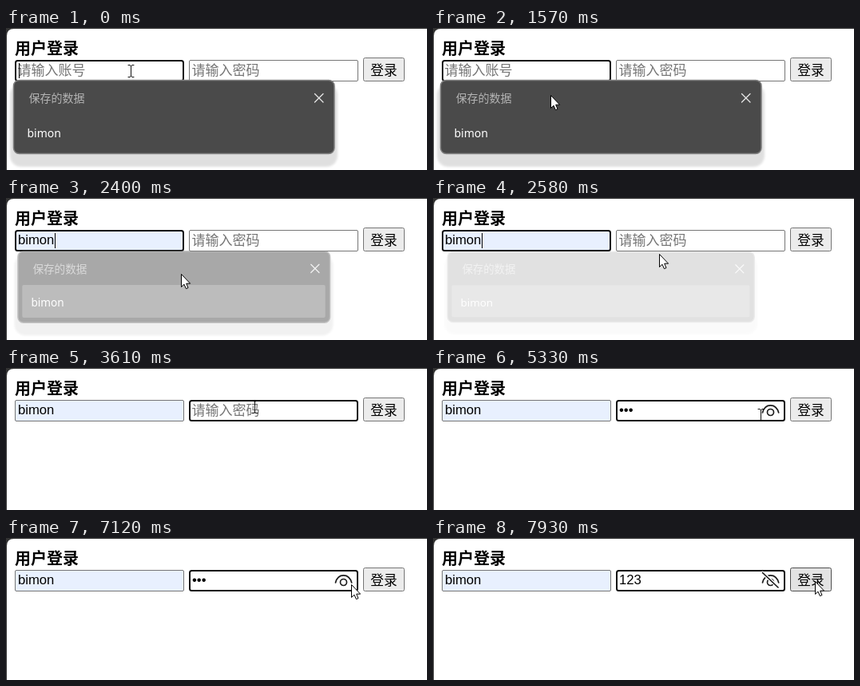
Recreate the animation shown at these times as an HTML page. Size 527 px wide and 178 px high, loop 8 s.

```html
<!DOCTYPE html>
<html lang="zh-CN">
<head>
<meta charset="utf-8">
<title>用户登录</title>
<style>
  html, body { margin: 0; width: 100%; height: 100%; overflow: hidden; background: #333; }
  svg { display: block; width: 527px; height: 178px; }
  text { font: 16.67px "Liberation Sans", sans-serif; white-space: pre; }
  .cjk { font-family: "Noto Sans CJK SC", "Noto Sans CJK", sans-serif; }
  .title { font-size: 20px; font-weight: 700; }
  .hint { font-size: 17px; fill: #757575; }
  .head { font-size: 14px; fill: #b4b4b4; }
  .item { font: 500 14px "Noto Sans", "Open Sans", sans-serif; fill: #fff; }
  .shadow { opacity: .12; filter: blur(1.5px); }
  .line { fill: none; stroke-linecap: round; }
</style>
</head>
<body>
<svg viewBox="0 0 527 178">
  <path d="M1 178V10Q1 1 10 1H527V178Z" fill="#fff"/>
  <text class="cjk title" x="11" y="32.5">用户登录</text>

  <rect id="user"/>
  <text id="userHint" class="cjk hint" x="14.5" y="58.7">请输入账号</text>
  <text id="userText" x="15" y="58">bimon</text>

  <rect id="pass"/>
  <text id="passHint" class="cjk hint" x="232.5" y="58.7">请输入密码</text>
  <text id="passText" x="233" y="58"></text>
  <g id="eye" class="line" stroke="#1c1c1c" stroke-width="1.7">
    <path d="M412.5 56C414 50 418 46.8 422.5 46.8S431 50 432.7 56"/>
    <circle cx="422.5" cy="55.5" r="4"/>
    <g id="slash">
      <path d="M412.5 43.5L433 62.5" stroke="#fff" stroke-width="4"/>
      <path d="M412.5 43.5L432 62"/>
    </g>
  </g>

  <rect id="button" x="447.5" y="37.5" width="51" height="29" rx="2"/>
  <text class="cjk" x="456.3" y="58.7">登录</text>
  <rect id="caret" y="44" height="19"/>

  <g id="popup">
    <rect class="shadow" x="5" y="70" width="410" height="104" rx="14"/>
    <rect x="9.5" y="65.5" width="401.5" height="92" rx="7" fill="#4a4a4a" stroke="#808080" stroke-width="1.5"/>
    <rect id="row" x="15" y="109" width="390" height="42" rx="2" fill="#757575"/>
    <text class="cjk head" x="28.5" y="93.3">保存的数据</text>
    <text class="item" x="26.5" y="137">bimon</text>
    <path class="line" d="M386.5 82.5l10.5 10.5m0-10.5l-10.5 10.5" stroke="#e6e6e6" stroke-width="1.3"/>
  </g>

  <path id="arrow" d="M.5.5V16.5L4 13.2L6.4 18.7L9 17.6L6.7 12.2H11.6Z" fill="#fff" stroke="#000"/>
  <g id="beam" class="line">
    <path d="M-3.5-7.5H-1.5L0-6.5L1.5-7.5H3.5M0-6.5V6.5M-3.5 7.5H-1.5L0 6.5L1.5 7.5H3.5" stroke="#111"/>
  </g>
</svg>
<script>
const LOOP = 8000, BLINK = 515, FADE = 560;
const HOVER = 1640, PICK = 2110, FOCUS = 3000, REVEAL = 7550;
const KEYS = [3970, 4160, 4360];
const RESETS = [-265, PICK, FOCUS + 90, ...KEYS];   // caret blink restarts

// pointer moves: start, end, x, y
const HOME = [156, 54];
const MOVES = [
  [1290, 1990, 133, 128],
  [2160, 2580, 283, 70],
  [2580, 2900, 311, 49],
  [4890, 5330, 410, 59],
  [5330, 5630, 430, 65],
  [5730, 6430, 458, 63],
  [6550, 7310, 423, 56],
  [REVEAL, 7930, 478, 54]
];

const el = {};
document.querySelectorAll("[id]").forEach(n => el[n.id] = n);

const clamp = v => Math.min(1, Math.max(0, v));
const show = (node, on) => node.style.display = on ? "" : "none";
const set = (node, attrs) => {
  for (const k in attrs) node.setAttribute(k, attrs[k]);
};

function pointer(t) {
  let [x, y] = HOME;
  for (const [from, to, nx, ny] of MOVES) {
    const p = clamp((t - from) / (to - from));
    x += (nx - x) * p;
    y += (ny - y) * p;
  }
  return [Math.round(x), Math.round(y)];
}

function field(node, x, focused, hovered, fill) {
  const w = focused ? 2 : 1;
  set(node, {
    x: x + w / 2, y: 40 + w / 2, width: 212 - w, height: 27 - w,
    rx: focused ? 2.5 : 1.5, fill, "stroke-width": w,
    stroke: focused ? "#101010" : hovered ? "#4f4f4f" : "#767676"
  });
}

function drawCaret(t, inPass, filled, typed) {
  const since = t - RESETS.filter(r => r <= t).pop();
  const settling = inPass && t < FOCUS + 90;
  show(el.caret, !settling && t < REVEAL && Math.floor(since / BLINK) % 2 === 0);
  set(el.caret, {
    x: inPass ? Math.floor(233 + typed * 5.83) : filled ? 61 : 16,
    width: inPass ? 2 : 1
  });
}

function drawPopup(t, filled) {
  const alpha = clamp(1 - (t - PICK) / FADE);
  const scale = .948 + .052 * alpha;
  show(el.popup, alpha > 0);
  show(el.row, filled);
  set(el.popup, {
    opacity: alpha,
    transform: `translate(210 112) scale(${scale}) translate(-210 -112)`
  });
}

function draw(t) {
  const [x, y] = pointer(t);
  const inside = (l, top, r, b) => x >= l && x < r && y >= top && y < b;
  const overUser = inside(11, 40, 223, 65);
  const overPass = inside(229, 40, 441, 67);
  const overButton = inside(447, 37, 499, 67);
  const filled = t >= HOVER, inPass = t >= FOCUS, revealed = t >= REVEAL;
  const typed = KEYS.filter(k => t >= k).length;

  field(el.user, 11, !inPass, overUser, filled ? "#e8f0fe" : "#fff");
  field(el.pass, 229, inPass, overPass, "#fff");
  show(el.userHint, !filled);
  show(el.userText, filled);
  show(el.passHint, !typed);
  el.passText.textContent = (revealed ? "123" : "•••").slice(0, typed);
  show(el.eye, typed);
  show(el.slash, revealed);
  set(el.button, {
    fill: overButton ? "#e3e3e3" : "#ececec",
    stroke: overButton ? "#4f4f4f" : "#767676"
  });

  drawCaret(t, inPass, filled, typed);
  drawPopup(t, filled);

  const beam = overUser || overPass && !(typed && x >= 412);
  show(el.beam, beam);
  show(el.arrow, !beam);
  set(el.beam, { transform: `translate(${x + .5} ${y})` });
  set(el.arrow, { transform: `translate(${x} ${y})` });
}

const start = performance.now();
function tick() {
  draw((performance.now() - start) % LOOP);
  requestAnimationFrame(tick);
}
tick();
</script>
</body>
</html>
```
